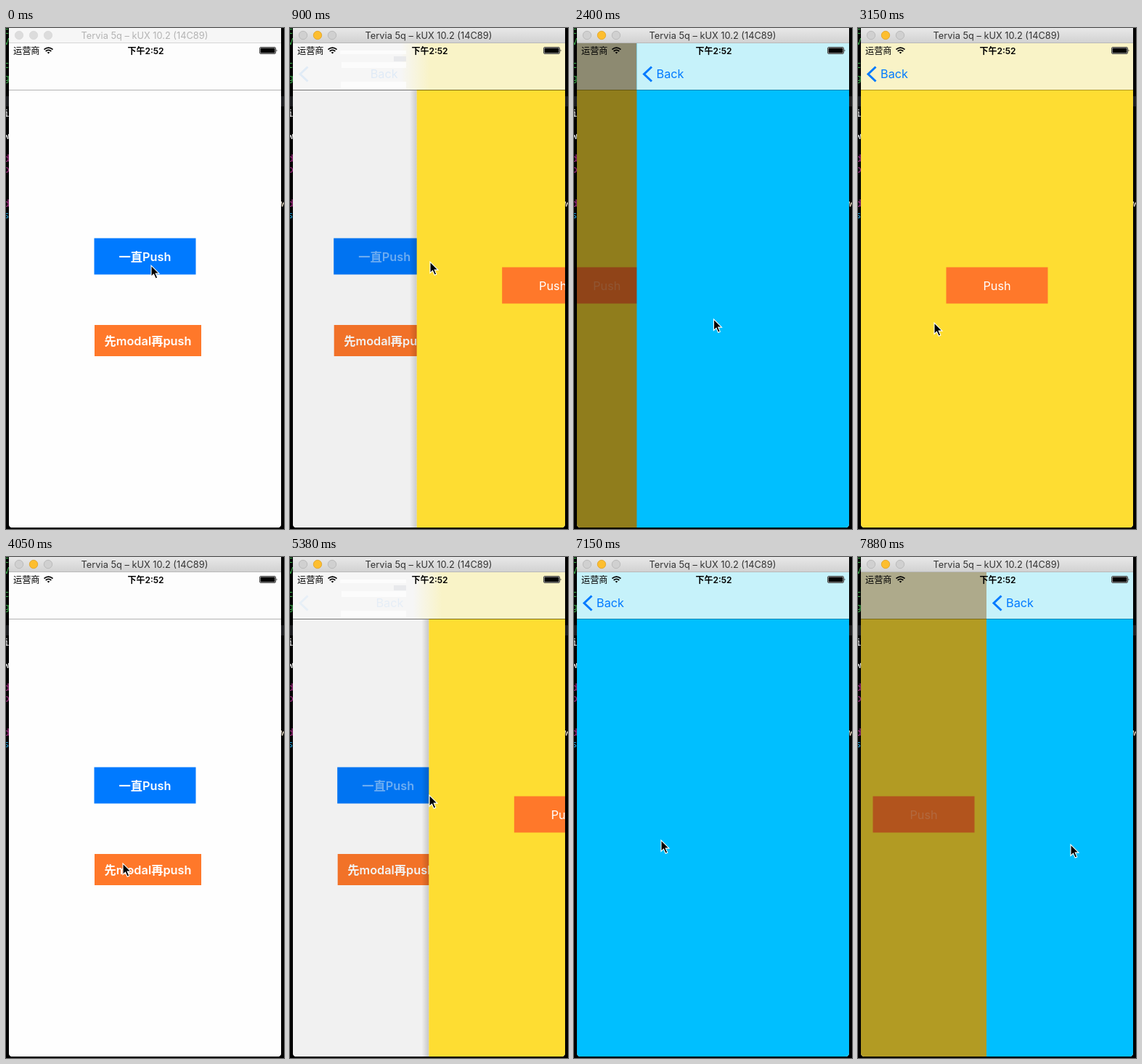
Write an HTML page that moves like this. It is 383 px wide and 690 px high and loops after 8000 ms.

```html
<!DOCTYPE html>
<html lang="zh-CN">
<head>
<meta charset="utf-8">
<title>Push and drag back</title>
<style>
html, body { margin: 0; width: 100%; height: 100%; overflow: hidden; background: #000; }
svg { display: block; width: 100vw; height: 100vh; }
text { font-family: Inter, "Noto Sans CJK SC", "Noto Sans CJK", sans-serif; }
.mid { text-anchor: middle; }
.btn { fill: #fff; font-size: 16.3px; }
.bold { font-weight: 600; }
.back { fill: #007aff; font-size: 16.3px; }
.chev { fill: none; stroke: #007aff; stroke-width: 3; }
.code { font: 12px "Noto Sans Mono", monospace; text-anchor: end; }
</style>
</head>
<body>
<svg viewBox="0 0 383 690">
  <defs>
    <clipPath id="win"><path d="M4 0H379V683Q379 688 374 688H9Q4 688 4 683Z"/></clipPath>
    <linearGradient id="titleFill" x2="0" y2="1">
      <stop offset="0" stop-color="#e8e8e8"/><stop offset="1" stop-color="#d2d2d2"/>
    </linearGradient>
    <linearGradient id="shadeFill">
      <stop offset="0" stop-opacity="0"/><stop offset="1"/>
    </linearGradient>
    <linearGradient id="blend" gradientUnits="userSpaceOnUse" y1="0" y2="0">
      <stop id="mixA" offset="0"/><stop id="mixB" offset="1"/>
    </linearGradient>
  </defs>
  <rect width="383" height="690"/>
  <rect y="94" width="383" height="14" fill="#1c1d20"/>
  <g id="code"></g>

  <g clip-path="url(#win)">
    <rect x="4" width="375" height="688" fill="#fff"/>
    <g id="pages"></g>
    <g id="pushBar">
      <rect x="4" y="21" width="375" height="64" fill="url(#blend)"/>
      <g id="haze">
        <path d="M69 31H160V36H69ZM71 47H160V55H71ZM70 74H160V84H70Z" fill="#fff" opacity=".7"/>
        <rect x="143" y="39" width="17" height="7" fill="#dfe1e6" opacity=".6"/>
      </g>
      <path d="M4 85.5H379" stroke="#000" stroke-opacity=".3"/>
      <path id="chev" class="chev" d="M24.5 53.5L14 63.5L24.5 73.5"/>
      <text id="oldBack" class="back" y="69">Back</text>
      <text id="newBack" class="back" y="69">Back</text>
    </g>

    <rect id="title" x="4" width="375" height="20"/>
    <path id="titleLine" d="M4 20.5H379"/>
    <g id="lights"></g>
    <text id="titleText" class="mid" x="191" y="15" font-size="12.8">Tervia 5q – kUX 10.2 (14C89)</text>

    <text x="10" y="35.5" font-size="12.2">运营商</text>
    <g fill="none" stroke="#000" stroke-width="1.7">
      <path d="M52.5 29.7Q58.5 24.5 64.5 29.7M54.7 32Q58.5 28.8 62.3 32"/>
      <path d="M58.5 35.5L56.6 33.6Q58.5 32.2 60.4 33.6Z" fill="#000" stroke="none"/>
    </g>
    <text class="mid bold" x="192.5" y="35.5" font-size="12">下午2:52</text>
    <rect x="349.5" y="26.5" width="22" height="9" rx="1.5" fill="#fff" stroke="#000" stroke-width=".7"/>
    <rect x="350.5" y="27.5" width="20" height="7" rx=".6"/>
    <path d="M372.6 29.2Q374.4 31 372.6 32.8Z"/>
  </g>
  <path id="cursor" d="M0 0V15.4L3.5 12.1L6.2 18.2L8.8 17.1L6.2 11.1H11Z" stroke="#fff" stroke-width="1.1"/>
</svg>
<script>
const $ = id => document.getElementById(id);
const set = (el, attrs) => { for (const k in attrs) el.setAttribute(k, attrs[k]); };
const clamp = v => Math.max(0, Math.min(1, v));

const LOOP = 8000, W = 375;
const BAR = ['#fdfdfd', '#f9f3c7', '#c6f2fa'];
const FILL = ['#fefefe', '#fedd32', '#00bfff'];

// Editor letters peeking out beside the window
const letters = [['c', 8, '#3fb950'], ['V', 23, '#3fb950'], ['c', 55, '#3fb950'], ['g', 73, '#3fb950'],
  ['i', 122, '#fff'], ['w', 153, '#fff'], ['d', 184, '#c2339a'], ['p', 199, '#c2339a'],
  ['d', 246, '#c2339a'], ['s', 262, '#1fa5e0']];
$('code').innerHTML = letters.map(([c, y, fill]) =>
  `<text class="code" x="4.5" y="${y}" fill="${fill}">${c}</text>`).join('') +
  '<text class="code" x="386" y="246" fill="#f3e6d0">w</text>';

$('lights').innerHTML = [18, 38, 58].map(x => `<circle cx="${x}" cy="10" r="5.7"/>`).join('');

const button = (x, y, w, h, fill, label, cls) =>
  `<rect x="${x}" y="${y}" width="${w}" height="${h}" fill="${fill}"/>
   <text class="btn mid ${cls}" x="${x + w / 2}" y="${y + h / 2 + 6}">${label}</text>`;
const contents = [
  button(121.5, 289.5, 140, 50, '#007aff', '一直Push', 'bold tap') +
    button(122, 409, 147, 43, '#ff782a', '先modal再push', 'bold'),
  button(121.5, 329.5, 140, 50, '#ff782a', 'Push', 'tap'),
  ''
];
$('pages').innerHTML = contents.map((body, i) => `<g>
  <rect class="shade" x="-6" y="86" width="10" height="602" fill="url(#shadeFill)"/>
  <rect x="4" y="21" width="375" height="667" fill="${FILL[i]}"/>${body}
  <rect x="4" y="21" width="375" height="64" fill="${BAR[i]}"/>
  <path d="M4 85.5H379" stroke="#000" stroke-opacity=".3"/>
  ${i ? '<path class="chev" d="M24.5 53.5L14 63.5L24.5 73.5"/><text class="back" x="31" y="69">Back</text>' : ''}
  <rect class="dim" x="4" y="21" width="375" height="667"/></g>`).join('');
const pages = [...$('pages').children].map(g => ({
  g, shade: g.querySelector('.shade'), dim: g.querySelector('.dim'), tap: g.querySelector('.tap')
}));

// Pointer path: time, x, y
const path = [[0, 200, 327], [300, 193, 322], [900, 193, 322], [1350, 181, 340], [1650, 181, 340],
  [2100, 110, 400], [2250, 110, 400], [2550, 275, 402], [2700, 250, 404], [3150, 105, 406],
  [3300, 110, 407], [3600, 280, 410], [3750, 295, 412], [4050, 161, 422], [4350, 208, 429],
  [4500, 208, 429], [4930, 192, 322], [5080, 192, 322], [5230, 192, 328], [5960, 192, 328],
  [6400, 166, 354], [6550, 166, 354], [7150, 120, 390], [7740, 300, 395], [7880, 293, 396]];
function pointer(t) {
  const n = path.findIndex(p => p[0] > t);
  if (n < 0) return path[path.length - 1].slice(1);
  const a = path[n - 1], b = path[n], k = (t - a[0]) / (b[0] - a[0]);
  return [a[1] + (b[1] - a[1]) * k, a[2] + (b[2] - a[2]) * k];
}

// Each move slides page low + 1 over page low
const moves = [
  { low: 0, tap: 750, at: 800 },
  { low: 1, tap: 1400, at: 1450 },
  { low: 1, drag: true, at: 2150, from: 110, drop: 2550 },
  { low: 0, drag: true, at: 3200, from: 105, drop: 3620 },
  { low: 0, tap: 5230, at: 5288 },
  { low: 1, tap: 6110, at: 6218 },
  { low: 1, drag: true, at: 7150, from: 120, drop: LOOP }
];

function spring(ms) {
  const s = Math.max(0, ms) * 0.01826;
  return 1 - Math.exp(-s) * (1 + s);
}

function slide(m, t) {
  if (!m.drag) return W * (1 - spring(t - m.at));
  const d = Math.max(0, pointer(Math.min(t, m.drop))[0] - m.from);
  const k = clamp((t - m.drop) / 250);
  return d + (W - d) * (1 - (1 - k) ** 2);
}

const ticks = [4500, 4640, 4790, 4930, 5080, 5230, 5380, 5520, 5670, 5810, 5960, 6110,
  6260, 6400, 6550, 6700, 6850, 7000, 7150, 7300, 7450, 7590, 7740, 7880];
const snap = t => t < 4500 ? Math.floor(t / 150) * 150 : ticks.filter(v => v <= t).pop();

function drawTitle(active) {
  set($('title'), { fill: active ? 'url(#titleFill)' : '#f6f6f6' });
  set($('titleLine'), { stroke: active ? '#b9b9b9' : '#d6d6d6' });
  set($('titleText'), { fill: active ? '#333' : '#b3b3b3' });
  [...$('lights').children].forEach((c, i) => set(c, active
    ? { fill: i === 1 ? '#fdbe2f' : '#d0d0d0', stroke: i === 1 ? '#dfa023' : '#b4b4b4', 'stroke-width': .8 }
    : { fill: '#dcdcdc', stroke: '#d2d2d2', 'stroke-width': .6 }));
}

function drawPages(m, t) {
  const low = m ? m.low : 0, d = m ? slide(m, t) : W, p = 1 - d / W;
  const drag = m && m.drag, moving = p > 0.001 && p < 0.999;
  pages.forEach((page, i) => {
    const isLow = i === low, isTop = i === low + 1;
    const shown = isLow && p < 0.999 || isTop && p > 0.001;
    const x = isLow ? -(drag ? .5 : .3) * W * p : d;
    set(page.g, { transform: `translate(${x.toFixed(2)} 0)`, display: shown ? 'inline' : 'none' });
    set(page.dim, { opacity: isLow ? (drag ? .56 : .1) * p : 0 });
    set(page.shade, { opacity: isTop && !drag ? .35 * (1 - p) : 0 });
    const pressed = isLow && m && (drag ? moving : t >= m.tap);
    if (page.tap) set(page.tap, { opacity: pressed ? (i ? .22 : .45) : 1 });
  });
  drawBar(low, d, p, moving && !drag);
}

function drawBar(low, d, p, shown) {
  set($('pushBar'), { display: shown ? 'inline' : 'none' });
  if (!shown) return;
  const edge = 4 + d;
  set($('blend'), { x1: edge - 22, x2: edge + 18 });
  set($('mixA'), { 'stop-color': low ? BAR[low] : '#f6f6f6' });
  set($('mixB'), { 'stop-color': BAR[low + 1] });
  set($('haze'), { opacity: low ? 0 : 4 * p * (1 - p) });
  set($('chev'), { opacity: low ? 1 : p ** 4 });
  set($('oldBack'), { x: 31 - 46 * p, opacity: low ? clamp(1 - 1.7 * p) : 0 });
  set($('newBack'), { x: 31 + 175 * (1 - p), opacity: low ? p * p * .85 + .12 : p ** 4 });
}

function draw(time) {
  const t = snap(time % LOOP);
  const started = moves.filter(m => t >= (m.drag ? m.at : m.tap));
  drawTitle(t >= 750);
  drawPages(started.pop(), t);
  const [x, y] = pointer(t);
  set($('cursor'), { transform: `translate(${x.toFixed(1)} ${y.toFixed(1)})` });
}

const start = performance.now();
function tick() {
  draw(performance.now() - start);
  requestAnimationFrame(tick);
}
tick();
</script>
</body>
</html>
```
